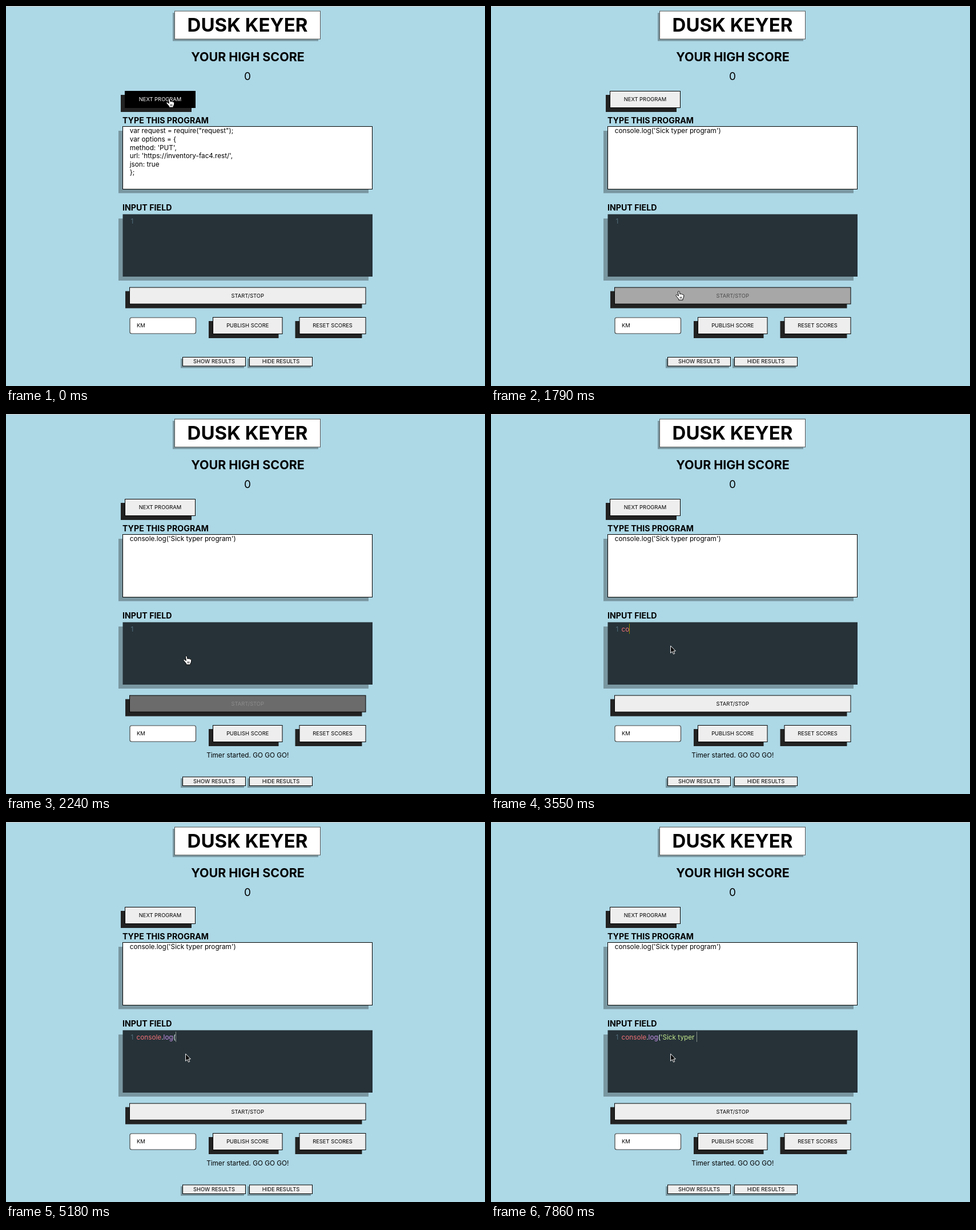
Recreate the animation shown at these times as an HTML page. Size 839 by 667 pixels, loop 8000 ms.

```html
<!DOCTYPE html>
<html lang="en">
<head>
<meta charset="utf-8">
<title>Typing game</title>
<style>
  html, body { margin: 0; width: 100%; height: 100%; overflow: hidden; background: #add8e6; }
  svg { display: block; width: 100%; height: 100%; font: 400 11.75px Inter, "Noto Sans", sans-serif; }
  text { white-space: pre; }
  .mid { text-anchor: middle; }
  .bold { font-weight: 700; }
  .heading { font-size: 14.2px; font-weight: 700; }
  .label { font-size: 9.4px; }
</style>
</head>
<body>
<svg viewBox="0 0 839 667">
  <rect width="839" height="667" fill="#add8e6"/>
  <rect width="839" height="1" fill="#d6d6d6"/>

  <rect x="292" y="12" width="255" height="49.5" fill="#7997a1"/>
  <rect x="295.5" y="9" width="255" height="49" fill="#fff" stroke="#555"/>
  <text class="mid bold" x="423" y="45" font-size="33">DUSK KEYER</text>
  <text class="mid bold" x="423.5" y="97" font-size="21.4">YOUR HIGH SCORE</text>
  <text class="mid" x="423" y="130" font-size="19">0</text>

  <text class="heading" x="204" y="205.7">TYPE THIS PROGRAM</text>
  <rect x="197" y="219" width="438" height="109.5" fill="#7997a1"/>
  <rect x="204.5" y="211.5" width="437" height="110" fill="#fff" stroke="#000"/>
  <g id="program"></g>

  <text class="heading" x="204" y="359">INPUT FIELD</text>
  <rect x="197" y="373" width="438" height="109" fill="#7997a1"/>
  <rect x="204.5" y="365.5" width="437.5" height="109.5" fill="#263238"/>
  <text x="218.5" y="381.6" fill="#546e7a">1</text>
  <text id="typed" x="228.5" y="381.6"></text>
  <rect id="caret" y="368" width="1" height="18"/>

  <g id="buttons"></g>
  <rect x="217" y="547" width="115.5" height="28" rx="3" fill="#fff" stroke="#444" stroke-width="1.2"/>
  <text class="label" x="229" y="564.3">KM</text>
  <text id="status" class="mid" x="423.3" y="603">Timer started. GO GO GO!</text>
  <g id="results"></g>

  <path id="hand" fill="#fff" stroke="#000" stroke-linejoin="round" d="M-1.5 .8C-1.5-.7 1-.7 1.2 .8L2 5C2.5 4 4 4 4.3 5
    C5 4.2 6.5 4.6 6.7 5.8C7.5 5.2 8.8 5.6 8.8 7C8.8 10 8 11 7 13V15H-.3V13.3C-2 11.5-3.5 9-5 7.5
    C-5.5 6-3.8 5.3-2.6 6.4L-.6 8ZM2.4 9.5V12.5M4.6 9.5V12.5"/>
  <path id="arrow" fill="#000" stroke="#fff" stroke-linejoin="round"
    d="M.6 .9V13.6L3.6 10.8L5.6 15.4L7.7 14.5L5.7 10H9.4Z"/>
</svg>
<script>
  const LOOP = 8000;
  const $ = id => document.getElementById(id);

  function add(parent, tag, attrs, content = '') {
    const node = document.createElementNS('http://www.w3.org/2000/svg', tag);
    for (const key in attrs) node.setAttribute(key, attrs[key]);
    node.textContent = content;
    return parent.appendChild(node);
  }

  function button(parent, label, x, y, w, h, shift, shade) {
    add(parent, 'rect', { x: x - shift, y: y + shift, width: w, height: h, fill: shade });
    const face = add(parent, 'rect', { x: x + .5, y: y + .5, width: w - 1, height: h - 1, fill: '#eee', stroke: '#000' });
    const text = add(parent, 'text', { class: 'label mid', x: x + w / 2, y: y + h / 2 + 3.1 }, label);
    return { face, text };
  }

  const big = (label, x, y, w) => button($('buttons'), label, x, y, w, 30, 7, '#222');
  const next = big('NEXT PROGRAM', 208, 149, 124);
  const start = big('START/STOP', 216, 493.5, 414.5);
  big('PUBLISH SCORE', 362, 546, 122.5);
  big('RESET SCORES', 513.5, 546, 117);
  button($('results'), 'SHOW RESULTS', 309, 616, 111, 16.5, 3, '#7997a1');
  button($('results'), 'HIDE RESULTS', 426, 616, 111, 16.5, 3, '#7997a1');

  const programs = [
    ['var request = require("request");', 'var options = {', "method: 'PUT',",
      "url: 'https://inventory-fac4.rest/',", 'json: true', '};'],
    ["console.log('Sick typer program')"]
  ].map(lines => {
    const group = add($('program'), 'g', {});
    lines.forEach((line, i) => add(group, 'text', { x: 216.7, y: 223.3 + i * 14.6 }, line));
    return group;
  });

  const tokens = [['console', '#f07178'], ['.', '#eeffff'], ['log', '#c792ea'], ['(', '#eeffff'], ["'Sick typer ", '#c3e88d']]
    .map(([text, fill]) => ({ text: text.replace(/ /g, '\u00a0'), span: add($('typed'), 'tspan', { fill }) }));

  // Each track lists [time, value]; a value holds until the next entry.
  const cursor = [[0, ['hand', 286, 163]], [900, ['arrow', 317, 318]], [1050, ['arrow', 323, 373]],
    [1200, ['arrow', 325, 414]], [1350, ['arrow', 327, 448]], [1490, ['arrow', 328, 474]],
    [1640, ['arrow', 329, 494]], [1790, ['hand', 329, 501]], [2090, ['hand', 323, 472]],
    [2240, ['hand', 316, 425]], [2390, ['hand', 314, 406]], [2800, ['arrow', 314, 406]]];
  const nextHover = [[0, 1], [900, .5], [1050, 0]];
  const startHover = [[0, 0], [1790, .3], [1940, .8], [2090, .96], [2240, .55], [2390, 0]];
  const caretOn = [[0, 0], [2660, 1], [3100, 0], [3400, 1], [5630, 0], [5930, 1]];
  const typedCount = [[0, 0], [3400, 1], [3550, 2], [3700, 3], [3850, 4], [4000, 5], [4140, 6], [4290, 7], [4440, 8],
    [4590, 9], [4740, 10], [4890, 11], [5180, 12], [5930, 13], [6230, 14], [6520, 16], [6670, 17], [6970, 18],
    [7270, 19], [7420, 20], [7560, 22], [7710, 23], [7860, 24]];

  const at = (track, t) => track.findLast(([time]) => time <= t)[1];
  const show = (node, on) => node.setAttribute('visibility', on ? 'visible' : 'hidden');
  const gray = v => `rgb(${v},${v},${v})`;

  function paint({ face, text }, hover) {
    face.setAttribute('fill', gray(Math.round(238 * (1 - hover))));
    text.setAttribute('fill', gray(Math.round(255 * hover)));
  }

  function render(t) {
    paint(next, at(nextHover, t));
    paint(start, at(startHover, t));
    programs.forEach((group, i) => show(group, (t >= 450) === (i === 1)));

    const started = t >= 2240;
    show($('status'), started);
    $('results').setAttribute('transform', `translate(0 ${started ? 20.5 : 0})`);

    const count = at(typedCount, t);
    let left = count;
    for (const { text, span } of tokens) {
      span.textContent = text.slice(0, Math.max(0, left));
      left -= text.length;
    }
    const width = count ? $('typed').getComputedTextLength() : 0;
    $('caret').setAttribute('x', Math.round(228.5 + width));
    $('caret').setAttribute('fill', count < 8 ? '#948a00' : '#87908c');
    show($('caret'), at(caretOn, t));

    const [shape, x, y] = at(cursor, t);
    for (const id of ['hand', 'arrow']) show($(id), id === shape);
    $(shape).setAttribute('transform', `translate(${x} ${y})`);
  }

  const origin = performance.now();
  function tick() {
    render((performance.now() - origin) % LOOP);
    requestAnimationFrame(tick);
  }
  tick();
</script>
</body>
</html>
```
